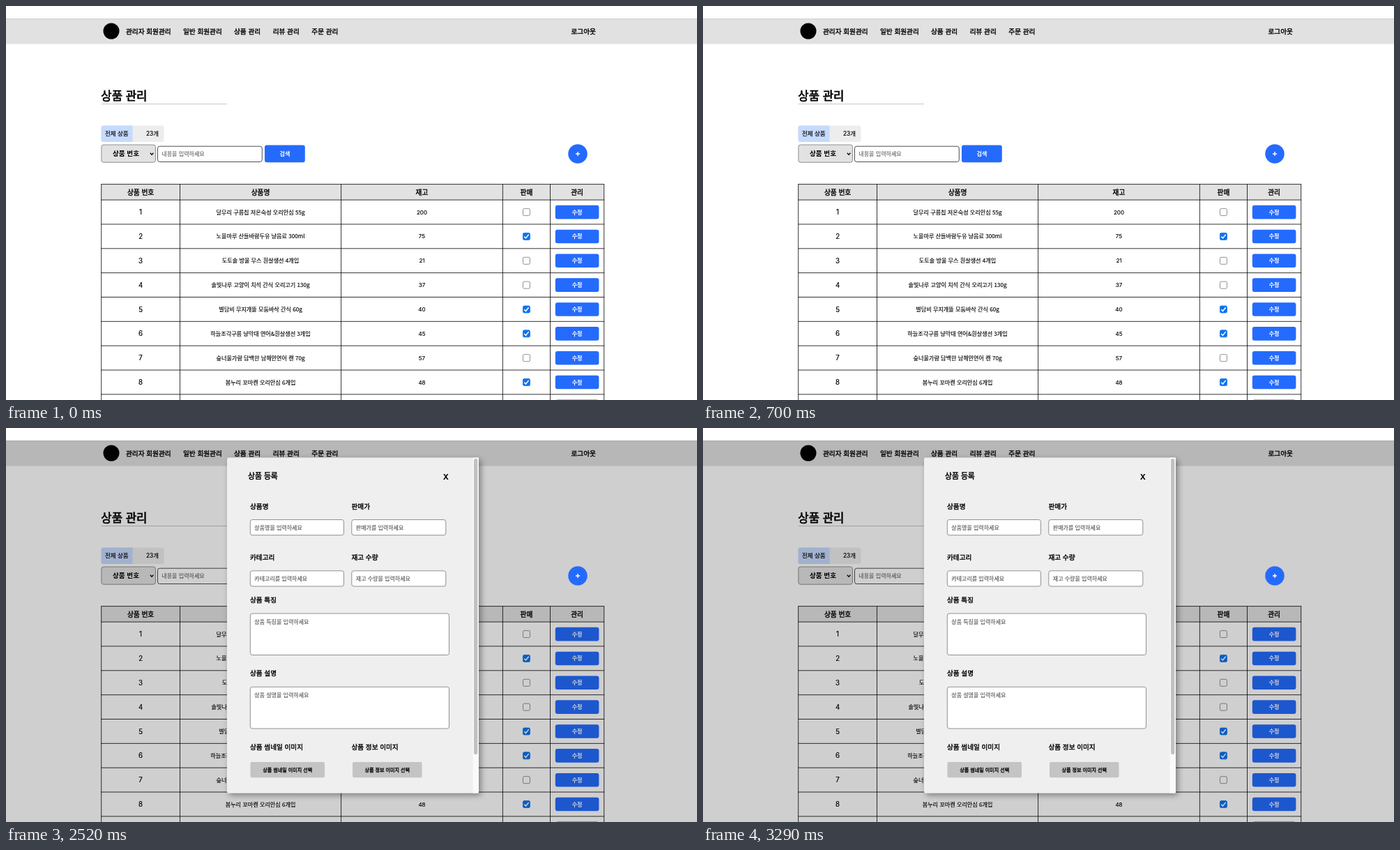
Recreate the animation shown at these times as an HTML page. Size 991x565 px, loop 3.92 s.

```html
<!DOCTYPE html>
<html lang="ko">
<head>
<meta charset="utf-8">
<title>상품 관리</title>
<style>
  html, body { margin: 0; width: 100%; height: 100%; overflow: hidden; background: #fff; }
  svg { display: block; width: 991px; height: 565px; }
  text { font-family: "Noto Sans CJK KR", "Noto Sans CJK", "Noto Sans KR", sans-serif; }
  .number { font-family: Inter, "Noto Sans CJK KR", sans-serif; }
</style>
</head>
<body>
<svg id="stage" viewBox="0 0 991 565" lang="ko">
  <defs>
    <filter id="shadow" x="-10%" y="-10%" width="120%" height="120%">
      <feDropShadow dx="3" dy="3" stdDeviation="4.5" flood-color="#000" flood-opacity=".4"/>
    </filter>
  </defs>
  <g id="page"></g>
  <rect id="dim" y="18" width="991" height="547" fill="#000" fill-opacity=".19"/>
  <g id="add"></g>
  <g id="modal"></g>
</svg>
<script>
const LOOP = 3920, OPEN_AT = 1470;
const BLUE = '#246bfd', GREY = '#e2e2e2', BORDER = '#767676';
const HAIR = 0.8, RADIUS = 3;
const $ = id => document.getElementById(id);
const page = $('page'), dim = $('dim'), add = $('add'), modal = $('modal');

function el(parent, tag, attrs) {
  const node = document.createElementNS('http://www.w3.org/2000/svg', tag);
  for (const key in attrs) node.setAttribute(key, attrs[key]);
  return parent.appendChild(node);
}

// Boxes are given by their left, top, right and bottom edges.
function box(parent, x1, y1, x2, y2, fill, attrs) {
  return el(parent, 'rect', {
    x: x1, y: y1, width: x2 - x1, height: y2 - y1, fill, 'stroke-width': HAIR, ...attrs
  });
}

function line(parent, d, stroke, width = HAIR, attrs) {
  return el(parent, 'path', { d, stroke, 'stroke-width': width, fill: 'none', ...attrs });
}

// Text is placed by its vertical centre; a thin outline gives the in-between weights.
function label(parent, text, x, y, size, { weight = 400, fill = '#000', ...attrs } = {}) {
  const outline = { 400: 0.018, 500: 0.04, 700: 0 }[weight];
  el(parent, 'text', {
    x, y: y + size * 0.37, 'font-size': size, fill, stroke: fill,
    'stroke-width': size * outline, 'font-weight': weight === 700 ? 700 : 400, ...attrs
  }).textContent = text;
}

const MIDDLE = { 'text-anchor': 'middle' };
const MEDIUM = { weight: 500 };
const NUMBER = { ...MIDDLE, class: 'number' };
const BUTTON_TEXT = { ...MIDDLE, fill: '#fff', weight: 700 };

function drawHeader() {
  box(page, 0, 18, 991, 54.5, '#e1e1e1');
  line(page, 'M0 18.4H991', '#cbcbcb');
  el(page, 'circle', { cx: 151, cy: 36, r: 11.5, fill: '#000' });
  [['관리자 회원관리', 172], ['일반 회원관리', 254], ['상품 관리', 327],
   ['리뷰 관리', 382.7], ['주문 관리', 438.3], ['로그아웃', 810.5]]
    .forEach(([text, x]) => label(page, text, x, 36.5, 9.65, MEDIUM));
}

function drawTools() {
  label(page, '상품 관리', 136.3, 128.5, 16.7, MEDIUM);
  line(page, 'M136.5 140.5H317', '#bbb');

  box(page, 136.5, 171.5, 226.5, 195, '#ededed', { rx: RADIUS });
  line(page, 'M181.5 171.5H139.5a3 3 0 0 0-3 3V192a3 3 0 0 0 3 3H181.5Z', 'none', 0, { fill: '#c6dafd' });
  label(page, '전체 상품', 142, 183.3, 8.5);
  label(page, '23개', 201, 183.3, 8.4, { class: 'number' });

  box(page, 136.9, 199, 214.4, 224.2, GREY, { rx: RADIUS, stroke: BORDER });
  label(page, '상품 번호', 153, 211.7, 9.6, { weight: 700 });
  line(page, 'M206.8 210.8l2.3 2.4 2.3-2.4', '#000', 1.3);

  box(page, 217.5, 201.2, 367.3, 223.5, '#fff', { rx: RADIUS, stroke: '#222' });
  label(page, '내용을 입력하세요', 223.3, 212.2, 8.05, { fill: '#666' });
  box(page, 371, 199.5, 428.8, 224.2, BLUE, { rx: RADIUS });
  label(page, '검색', 400, 212, 8.1, BUTTON_TEXT);

  el(add, 'circle', { cx: 820, cy: 212, r: 13.75, fill: BLUE });
  line(add, 'M817 212H823M820 209V215', '#fff', 1.4);
}

function drawTable() {
  const edges = [136.7, 249.5, 480.6, 712.4, 780.5, 857.7];
  const centres = edges.slice(1).map((x, i) => (x + edges[i]) / 2);
  const pitch = 34.85;
  const rows = [
    ['달무리 구름칩 저온숙성 오리안심 55g', 200, 0],
    ['노을마루 산들바람두유 냥음료 300ml', 75, 1],
    ['도토솔 방울 무스 흰살생선 4개입', 21, 0],
    ['솔빛나루 고양이 치석 간식 오리고기 130g', 37, 0],
    ['별담비 무지개뜰 모둠바삭 간식 60g', 40, 1],
    ['하늘조각구름 냥막대 연어&흰살생선 3개입', 45, 1],
    ['숲너울가람 담백한 남해안연어 캔 70g', 57, 0],
    ['봄누리 꼬마캔 오리안심 6개입', 48, 1]
  ];

  box(page, 136.5, 255.6, 857.7, 278, GREY);
  ['상품 번호', '상품명', '재고', '판매', '관리']
    .forEach((text, i) => label(page, text, centres[i], 267, 9.7, { ...MIDDLE, ...MEDIUM }));

  let grid = 'M136.3 255.6H858.1M136.3 278.1H858.1';
  rows.forEach(([name, stock, onSale], i) => {
    const y = 295.6 + i * pitch;
    label(page, i + 1, centres[0], y, 9.7, NUMBER);
    label(page, name, centres[1], y, 8.1, MIDDLE);
    label(page, stock, centres[2], y, 8.1, NUMBER);
    drawCheckbox(centres[3], y, onSale);
    drawEditButton(centres[4], y);
    grid += `M136.3 ${278.1 + (i + 1) * pitch}H858.1`;
  });
  drawEditButton(centres[4], 295.6 + rows.length * pitch);

  edges.forEach(x => grid += `M${x} 255.6V565`);
  line(page, grid, '#000');
}

function drawCheckbox(x, y, checked) {
  const color = checked ? '#0f73ee' : BORDER;
  box(page, x - 5, y - 5, x + 5, y + 5, checked ? color : '#fff', { rx: 1.8, stroke: color });
  if (checked) line(page, `M${x - 3.2} ${y + 0.2}l2.2 2.3 4.2-5.2`, '#fff', 1.5);
}

function drawEditButton(x, y) {
  box(page, x - 31.3, y - 9.8, x + 31.3, y + 9.8, BLUE, { rx: RADIUS });
  label(page, '수정', x, y, 8.1, BUTTON_TEXT);
}

function drawModal() {
  box(modal, 317, 42.5, 678, 523.5, '#efefef', { rx: 2, filter: 'url(#shadow)' });
  box(modal, 669.5, 42.5, 678, 523.5, '#fafafa', { rx: 1 });
  box(modal, 671, 44, 676.3, 468, '#c1c1c1', { rx: 2.6 });
  label(modal, '상품 등록', 347, 69.5, 10.8, MEDIUM);
  label(modal, 'X', 630.8, 69.5, 11, { ...NUMBER, weight: 700 });

  // Title, hint, left, title centre, field top, right, bottom
  [['상품명', '상품명을', 350, 112, 131.5, 484.5, 153.7],
   ['판매가', '판매가를', 495.5, 112, 131.5, 630.8, 153.7],
   ['카테고리', '카테고리를', 350, 185, 204.8, 484.5, 227],
   ['재고 수량', '재고 수량을', 495.5, 185, 204.8, 630.8, 227],
   ['상품 특징', '상품 특징을', 350, 246.3, 266, 635.5, 325.5],
   ['상품 설명', '상품 설명을', 350, 351.8, 371.3, 635.5, 431]
  ].forEach(([title, hint, x, y, top, right, bottom]) => {
    label(modal, title, x, y, 9.6, MEDIUM);
    box(modal, x + 0.3, top, right, bottom, '#fff', { rx: RADIUS, stroke: BORDER });
    const hintY = bottom - top > 30 ? top + 11.8 : (top + bottom) / 2 + 0.3;
    label(modal, hint + ' 입력하세요', x + 6.3, hintY, 8, { fill: '#555' });
  });

  [['상품 썸네일 이미지', 350, 350.5, 457], ['상품 정보 이미지', 495.5, 497, 596.5]]
    .forEach(([title, x, left, right]) => {
      label(modal, title, x, 457, 9.6, MEDIUM);
      box(modal, left, 479, right, 501.3, '#c4c4c4', { rx: 2 });
      label(modal, title + ' 선택', (left + right) / 2, 490.3, 7.05, { ...MIDDLE, ...MEDIUM });
    });
}

function render(time) {
  const shown = time % LOOP >= OPEN_AT ? 'visible' : 'hidden';
  dim.setAttribute('visibility', shown);
  modal.setAttribute('visibility', shown);
}

function tick() {
  render(performance.now());
  requestAnimationFrame(tick);
}

drawHeader();
drawTools();
drawTable();
drawModal();
render(0);
requestAnimationFrame(tick);
</script>
</body>
</html>
```
